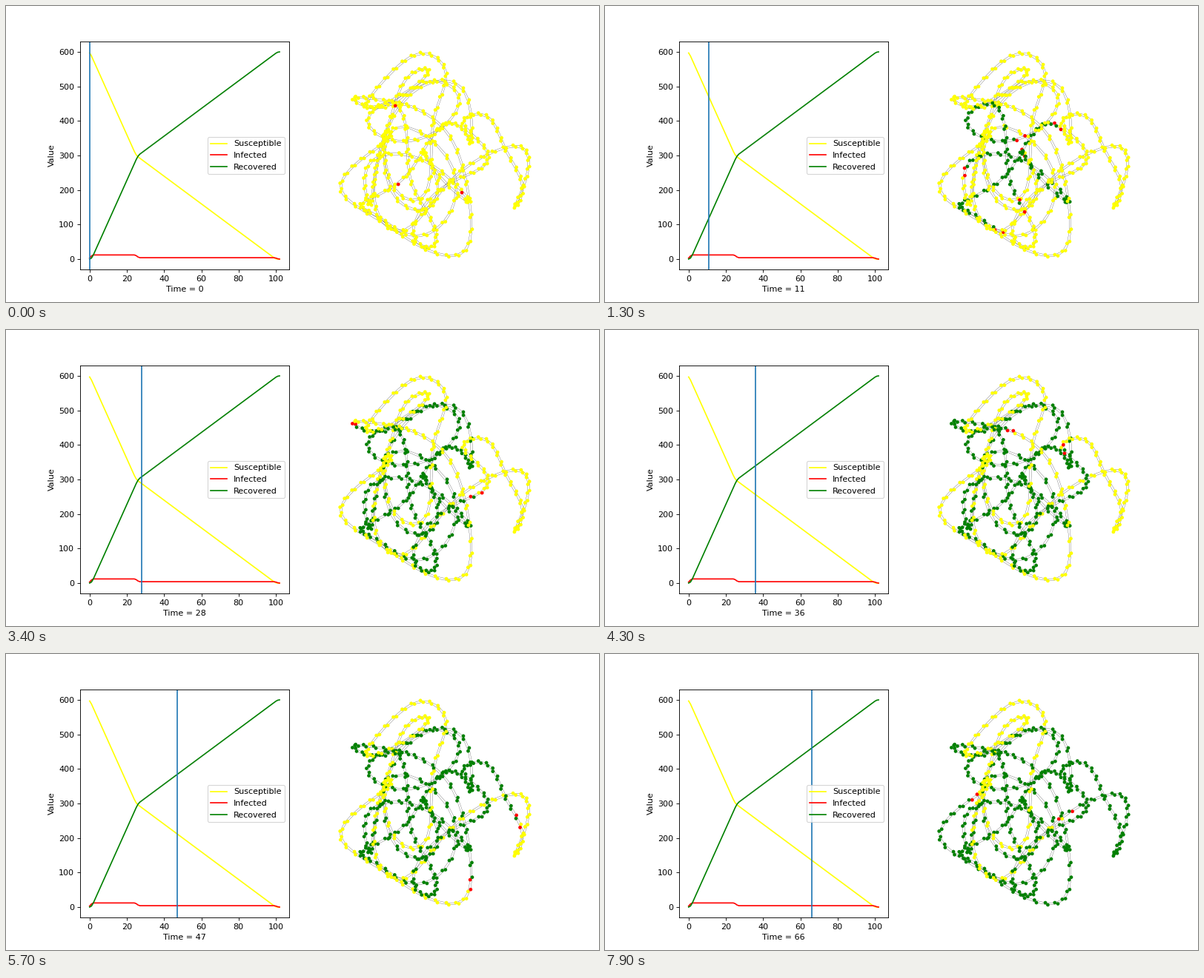
Recreate the animation shown at these times as a matplotlib script. Size 800x400 px, loop 8000 ms.

```python
import numpy as np
import matplotlib.pyplot as plt
from matplotlib.animation import FuncAnimation
from matplotlib.collections import LineCollection

FRAMES, INTERVAL, STEP = 80, 100, 120
SPACING = 4  # rungs between two key points
COLORS = np.array(["yellow", "red", "green"])

# Key points of the two closed ladders, in stage pixels.
LONG = [
    (524, 133), (541, 180), (547, 239), (573, 288), (576, 325), (549, 306),
    (585, 248), (640, 220), (645, 190), (617, 157), (649, 149), (674, 194),
    (697, 244), (687, 271), (702, 232), (696, 191), (643, 204), (588, 249),
    (538, 303), (499, 273), (503, 200), (520, 148), (541, 97), (570, 88),
    (534, 120), (487, 136), (513, 97), (561, 64), (594, 93), (576, 160),
    (568, 250), (524, 247), (511, 178), (518, 177), (481, 206), (452, 249),
    (503, 289), (565, 328), (619, 331), (625, 262), (600, 178), (552, 138),
    (511, 128), (469, 125), (510, 137), (565, 103), (611, 122), (583, 168),
    (523, 182), (488, 153),
]
SHORT = [
    (527, 241), (562, 197), (592, 160), (620, 171), (628, 180), (617, 113),
    (558, 110), (514, 168), (496, 243), (489, 266), (487, 218), (532, 200),
    (589, 225), (625, 265), (585, 230), (563, 196), (582, 238), (565, 275),
    (518, 246), (524, 165), (595, 204), (600, 278), (552, 311), (501, 284),
    (480, 267),
]


def closed_spline(points):
    """Periodic cubic spline, sampled once per rung."""
    p = np.array(points, float)
    after = np.roll(p, -1, 0)
    eye = np.eye(len(p))
    system = 4 * eye + np.roll(eye, 1, 0) + np.roll(eye, -1, 0)
    m = np.linalg.solve(system, 3 * (after - np.roll(p, 1, 0)))
    m_after = np.roll(m, -1, 0)
    u = (np.arange(SPACING) / SPACING)[:, None]
    curve = (p[:, None] + u * m[:, None]
             + u**2 * (3 * (after - p) - 2 * m - m_after)[:, None]
             + u**3 * (2 * (p - after) + m + m_after)[:, None])
    return curve.reshape(-1, 2)


def ladder(points, seeds):
    """Node places, edges and infection times of a circular ladder."""
    mid = closed_spline(points)
    count = len(mid)
    along = np.roll(mid, -1, 0) - np.roll(mid, 1, 0)
    along /= np.hypot(*along.T)[:, None]
    normal = along[:, ::-1] * [-1, 1]
    shift = 1.8 * along + 1.3 * normal
    a, b = mid + shift, mid - shift

    rails = [np.stack([r, np.roll(r, -1, 0)], 1) for r in (a, b)]
    edges = np.concatenate(rails + [np.stack([a, b], 1)])

    gap = np.abs(np.arange(count)[:, None] - np.array(seeds))
    dist = np.minimum(gap, count - gap).min(1)
    nodes = np.stack([a, b], 1).reshape(-1, 2)
    times = np.stack([dist, dist + 1], 1).ravel()
    return nodes[::-1], edges, times[::-1]


parts = [ladder(SHORT, [0, 50]), ladder(LONG, [0])]
nodes, edges, infected_at = (np.concatenate(x) for x in zip(*parts))


def state(t):
    """0 susceptible, 1 infected, 2 recovered."""
    return 1 + np.sign(t - infected_at).astype(int)


fig = plt.figure(figsize=(10, 5), dpi=80)
chart = fig.add_subplot(1, 2, 1)
days = np.arange(103)
totals = np.array([np.bincount(state(t), minlength=3) for t in days])
for k, name in enumerate(["Susceptible", "Infected", "Recovered"]):
    chart.plot(days, totals[:, k], color=COLORS[k], label=name)
marker = chart.axvline(0)
chart.set_ylabel("Value")
chart.legend(loc="center right")

net = fig.add_axes([0, 0, 1, 1])
net.set(xlim=(0, 800), ylim=(400, 0))
net.axis("off")
net.add_collection(LineCollection(edges, colors="black", linewidths=0.2, zorder=1))
dots = net.scatter(*nodes.T, s=18, linewidths=0, zorder=2)


def draw(frame):
    t = (frame * INTERVAL + INTERVAL // 2) // STEP
    marker.set_xdata([t, t])
    chart.set_xlabel(f"Time = {t}")
    dots.set_facecolor(COLORS[state(t)])
    return marker, dots


draw(0)
anim = FuncAnimation(fig, draw, frames=FRAMES, interval=INTERVAL,
                     repeat=True, repeat_delay=0)
plt.show()
```
